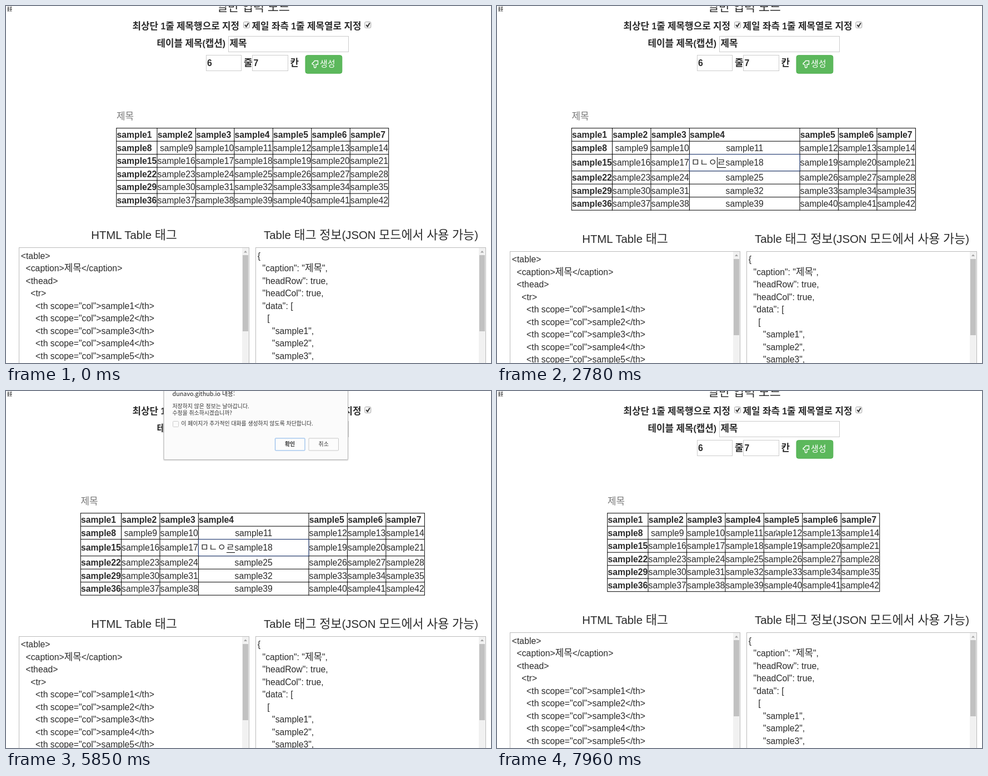
Animation of 873x642 px, one loop 8 s. Source, as an HTML page:

```html
<!DOCTYPE html>
<html lang="ko">
<head>
<meta charset="utf-8">
<title>표 편집</title>
<style>
  html, body { margin: 0; width: 100%; height: 100%; overflow: hidden; background: #fff; }
  svg { display: block; }
  text { font: 15.76px "Liberation Sans", Arial, sans-serif; fill: #2b2b2b; white-space: pre; }
  .k { font-family: "Noto Sans CJK KR", "Noto Sans CJK", sans-serif; font-size: 1.07em; }
  .b { font-weight: 700; }
  .m { text-anchor: middle; }
  .h { font-size: 20.4px; text-anchor: middle; }
  .cap { fill: #777; }
  .w { fill: #fff; }
  .go { fill: #fff; font-size: 14px; }
  .tiny { font-size: 4.5px; }
  .d { font: 9.9px "Noto Sans CJK KR", "Noto Sans CJK", sans-serif; fill: #333; }
  .d .k { font-size: 1em; }
  .d.b { font-weight: 700; }
  .d.t { font-size: 10.8px; fill: #222; }
  .grid, .line { stroke: #000; fill: none; }
  .line, .box { shape-rendering: crispEdges; }
</style>
</head>
<body>
<svg id="stage" width="873" height="642" viewBox="0 0 873 642"></svg>
<script>
const esc = s => s.replace(/&/g, '&amp;').replace(/</g, '&lt;');
const rich = s => esc(s).replace(/[ㄱ-힣]+/g, '<tspan class="k">$&</tspan>');
const text = (x, y, s, cls = '') => `<text x="${x}" y="${y}" class="${cls}">${rich(s)}</text>`;
const rect = (x, y, w, h, fill, stroke = 'none', more = 'class="box"') =>
  `<rect x="${x}" y="${y}" width="${w}" height="${h}" fill="${fill}" stroke="${stroke}" ${more}/>`;
const group = (id, body) => `<g id="${id}">${body}</g>`;

const checkbox = (x, y) =>
  rect(x, y, 11, 11, '#f4f4f4', '#a8a8a8', 'rx="2"') +
  `<path d="M${x + 2.5} ${y + 5.5}l2.5 3 4-6.5" fill="none" stroke="#333" stroke-width="2"/>`;

const form =
  text(2, 5, '표로', 'tiny b') + text(2, 8.5, '표로', 'tiny b') +
  text(445, 8.5, '일반 입력 모드', 'h') +
  text(227.5, 41.7, '최상단 1줄 제목행으로 지정', 'b') + checkbox(427.5, 28.5) +
  text(442.5, 41.7, '제일 좌측 1줄 제목열로 지정', 'b') + checkbox(645.8, 28.5) +
  text(271.5, 73, '테이블 제목(캡션)', 'b') +
  rect(400.5, 54.5, 216, 28, '#fff', '#ccc') + text(402.5, 73, '제목', 'b') +
  rect(360.5, 88.5, 63, 28, '#fff', '#ccc') + text(362, 108, '6', 'b') +
  text(428, 107.5, '줄', 'b') +
  rect(443.5, 88.5, 63.5, 28, '#fff', '#ccc') + text(445.5, 108, '7', 'b') +
  text(511.5, 107.5, '칸', 'b') +
  rect(539, 88.7, 65.8, 32.5, '#5cb85c', '#4cae4c', 'rx="3.5"') +
  '<path d="M554.5 110V106L551 104.5Q551 102 553 102L555.5 98.5H561.5V105H558V110Q556 112 554.5 110Z" fill="none" stroke="#fff" stroke-width="1.3"/>' +
  text(565, 109.3, '생성', 'go');

// Edges of the 7 columns and 6 rows; editing widens one cell.
function table(left, editing) {
  const xs = [left], ys = [219.7];
  for (let c = 0; c < 7; c++) xs.push(xs[c] + (c === 0 ? 73.2 : editing && c === 3 ? 198.6 : 69.45));
  for (let r = 0; r < 6; r++) ys.push(ys[r] + (editing && r === 2 ? 30 : 23.5));
  let out = text(left + .3, 204.3, '제목', 'cap'), d = '';
  for (const x of xs) d += `M${x} ${ys[0] - .5}V${ys[6] + .5}`;
  for (const y of ys) d += `M${left} ${y}H${xs[7]}`;
  out += `<path class="grid" d="${d}"/>`;
  for (let r = 0; r < 6; r++) for (let c = 0; c < 7; c++) {
    if (editing && r === 2 && c === 3) {
      out += rect(xs[c], ys[r], xs[c + 1] - xs[c], 30, '#fff', '#1f3a78', '');
      continue;
    }
    const head = !r || !c;
    out += text(head ? xs[c] + .7 : (xs[c] + xs[c + 1]) / 2, (ys[r] + ys[r + 1]) / 2 + 5.7,
      'sample' + (r * 7 + c + 1), head ? 'b' : 'm');
  }
  return out;
}

const area = (x, lines) =>
  rect(x, 434.5, 414, 260, '#fff', '#bbb') +
  rect(x + 401.5, 435, 12, 240, '#f1f1f1') +
  rect(x + 402.5, 448, 10, 137, '#c1c1c1') +
  `<path d="M${x + 404.5} 443.5h6l-3-3.5z" fill="#a3a3a3"/>` +
  lines.map((s, i) => text(x + 3.3, 454.5 + 22.5 * i, s)).join('');

const samples = [1, 2, 3, 4, 5].map(n => 'sample' + n);
const output =
  text(230.5, 419, 'HTML Table 태그', 'h') +
  text(657, 419, 'Table 태그 정보(JSON 모드에서 사용 가능)', 'h') +
  area(23.5, ['<table>', '  <caption>제목</caption>', '  <thead>', '    <tr>',
    ...samples.map(s => `      <th scope="col">${s}</th>`)]) +
  area(449.5, ['{', '  "caption": "제목",', '  "headRow": true,', '  "headCol": true,', '  "data": [', '    [',
    ...samples.slice(0, 3).map(s => `      "${s}",`)]);

const dialog =
  rect(283, -20, 333.5, 145.5, '#000', 'none', 'rx="2" opacity=".12"') +
  rect(284, -20, 331.5, 143.5, '#fbfbfb', '#b4b4b4', 'rx="2"') +
  text(299.5, 9, 'dunavo.github.io 내용:', 'd t') +
  text(299.5, 31.2, '저장하지 않은 정보는 날아갑니다.', 'd') +
  text(299.5, 43.2, '수정을 취소하시겠습니까?', 'd') +
  rect(300.5, 54.5, 10, 10, '#fbfbfb', '#ccc', 'rx="1"') +
  text(315.3, 62.3, '이 페이지가 추가적인 대화를 생성하지 않도록 차단합니다.', 'd') +
  rect(484.5, 85, 53.5, 22, '#fcfcfc', '#7fb0e8', 'rx="1"') + text(511, 98.6, '확인', 'd b m') +
  rect(545, 85, 53.5, 22, '#fcfcfc', '#c8c8c8', 'rx="1"') + text(571.7, 98.6, '취소', 'd m');

document.getElementById('stage').innerHTML =
  form +
  group('view', table(198.8, false)) +
  group('mark', rect(412, 269, 68, 19, '#3390ff') + text(445.9, 284.2, 'sample18', 'm w')) +
  group('edit', table(134.3, true) +
    '<text id="entry" y="287"></text>' +
    '<path id="under" class="line" d="M0 290.5h15"/>' +
    '<path id="caret" class="line" d="M0 272V290.5"/>') +
  group('output', output) +
  group('dialog', dialog) +
  '<path id="cursor" d="M.5.5V9L2.6 7.2 3.8 9.8 5.1 9.2 4 6.7H6.7Z" fill="#fff" stroke="#444" stroke-width=".7"/>';

const el = id => document.getElementById(id);
const show = (id, on) => el(id).setAttribute('display', on ? 'inline' : 'none');
const move = (id, x, y) => el(id).setAttribute('transform', `translate(${x} ${y})`);
const within = (t, a, b) => t >= a && t < b;
const TICK = 70;
const steps = (t, from) => Math.floor((t - from) / TICK);
const between = (a, b, p) => a.map((v, i) => v + (b[i] - v) * p);

function cursorAt(t) {
  const mid = [581, 169], cell = [447, 273];
  if (t < 240) return null;
  if (t < 560) return between([738, 21], mid, Math.min(steps(t, 240) / 2, 1));
  if (t < 1370) {
    const p = Math.min((steps(t, 560) + 1) / 8, 1);
    return between(mid, cell, p * (2 - p));
  }
  if (within(t, 4640, 5850) || within(t, 5920, 7270)) return [453, 275];
  if (t >= 7340) return between([448, 277], [502, 249], t < 7890 ? 0 : t < 7960 ? .5 : 1);
  return null;
}

// The dialog opens twice, growing slightly as it fades in.
function dialogAlpha(t) {
  if (!within(t, 4640, 7340)) return 0;
  return [.08, .3, .55, .85, 1][Math.min(steps(t, t < 5920 ? 4640 : 5920), 4)];
}

function draw(t) {
  const editing = within(t, 1510, 7340);
  show('view', !editing);
  show('edit', editing);
  show('mark', within(t, 1370, 1510));
  move('output', 0, editing ? 6.5 : 0);

  const typed = [2340, 2570, 2710, 2780].filter(k => t >= k).length;
  const slot = i => 349.5 + 15.5 * i;
  const caretX = Math.floor(slot(Math.max(typed - 1, 0))) + .5;
  el('entry').setAttribute('x', Array.from({ length: typed + 1 }, (_, i) => slot(i)).join(' '));
  el('entry').innerHTML = rich('ㅁㄴㅇㄹ'.slice(0, typed) + 'sample18');
  show('under', typed);
  move('under', caretX, 0);
  show('caret', within(t, 1510, 2000) || within(t, 2340, 3320) || within(t, 3830, 4380));
  move('caret', caretX, 0);

  const alpha = dialogAlpha(t), scale = .947 + .053 * alpha;
  show('dialog', alpha);
  el('dialog').setAttribute('opacity', alpha);
  el('dialog').setAttribute('transform', `translate(449.5 41) scale(${scale}) translate(-449.5 -41)`);

  const at = cursorAt(t);
  show('cursor', at);
  if (at) move('cursor', ...at);
}

const start = performance.now();
(function frame() {
  draw((performance.now() - start) % 8000);
  requestAnimationFrame(frame);
})();
</script>
</body>
</html>
```
